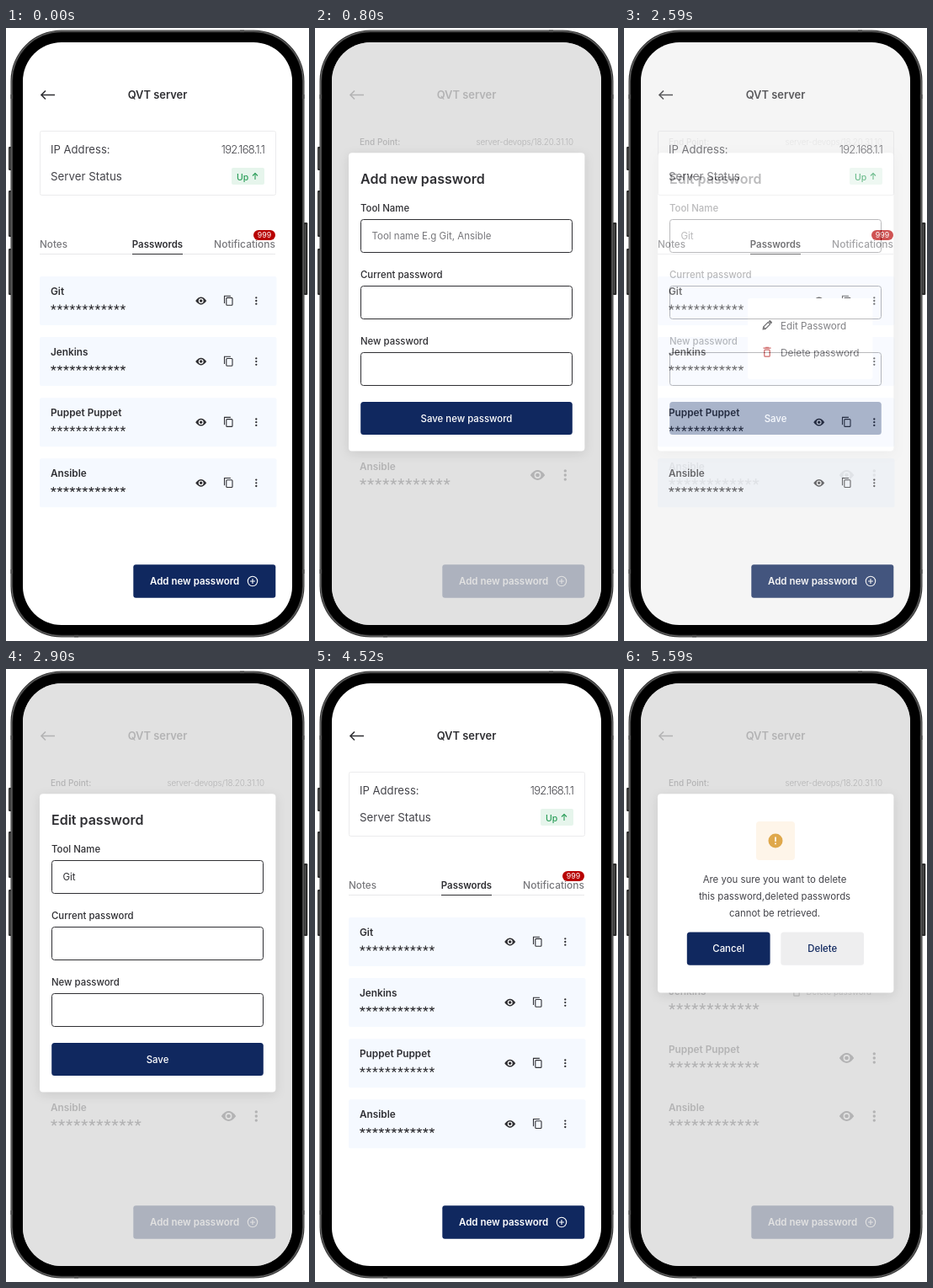
An HTML page with a canvas that plays this animation: 360x728 px, repeating every 5900 ms.

```html
<!DOCTYPE html>
<html lang="en">
<head>
<meta charset="utf-8">
<title>Password manager</title>
<style>
html, body { margin: 0; width: 100%; height: 100%; overflow: hidden; background: #fff; }
canvas { display: block; width: 360px; height: 728px; }
</style>
</head>
<body>
<canvas id="stage"></canvas>
<script>
const W = 360, H = 728, LOOP = 5900, STEP = 75;
const SCREEN = { x: 20, y: 17, w: 320, h: 692, r: 46 };
const LEFT = 40, RIGHT = 320, MID = 180, PAD = 53;
const NAVY = '#10285f', INK = '#2f2f33', TEXT = '#44444a', GREY = '#77777b';
const TOOLS = ['Git', 'Jenkins', 'Puppet Puppet', 'Ansible'];
const DPR = window.devicePixelRatio || 1;

let c;

function makeCanvas(canvas) {
  canvas.width = W * DPR;
  canvas.height = H * DPR;
  const ctx = canvas.getContext('2d');
  ctx.scale(DPR, DPR);
  return ctx;
}

function box(x, y, w, h, r, fill, stroke, width = 1) {
  c.beginPath();
  c.roundRect(x, y, w, h, r);
  if (fill) { c.fillStyle = fill; c.fill(); }
  if (stroke) { c.strokeStyle = stroke; c.lineWidth = width; c.stroke(); }
}

function disc(x, y, r, fill, stroke, width) {
  box(x - r, y - r, 2 * r, 2 * r, r, fill, stroke, width);
}

function line(color, width, ...p) {
  c.beginPath();
  for (let i = 0; i < p.length; i += 2) c.lineTo(p[i], p[i + 1]);
  c.strokeStyle = color;
  c.lineWidth = width;
  c.stroke();
}

function text(s, x, y, size, weight, color, align = 'left', spacing = 0) {
  c.font = `${weight} ${size}px Inter, "Open Sans", sans-serif`;
  c.textAlign = align;
  c.letterSpacing = spacing + 'px';
  c.fillStyle = color;
  c.fillText(s, x, y);
}

// Arrow with its tip at x, y, pointing along angle.
function arrow(x, y, angle, length, head, color, width) {
  c.save();
  c.translate(x, y);
  c.rotate(angle);
  line(color, width, 0, 0, -length, 0);
  line(color, width, -head, -head, 0, 0, -head, head);
  c.restore();
}

function eye(x, y, w) {
  const bulge = w * 0.68;
  c.beginPath();
  c.moveTo(x - w / 2, y);
  c.quadraticCurveTo(x, y - bulge, x + w / 2, y);
  c.quadraticCurveTo(x, y + bulge, x - w / 2, y);
  c.fillStyle = INK;
  c.fill();
  disc(x, y, w * 0.18, null, '#fff', w * 0.09);
}

function copyIcon(x, y) {
  box(x - 2.6, y - 3.6, 7.2, 8.8, 1, null, INK, 1.1);
  line(INK, 1.1, x - 4.9, y + 3, x - 4.9, y - 5.8, x + 2.5, y - 5.8);
}

function pencil(x, y) {
  c.save();
  c.translate(x, y);
  c.rotate(-Math.PI / 4);
  box(-4.5, -1.7, 8, 3.4, 0, null, INK, 1.2);
  box(4.4, -2.2, 2.4, 4.4, 1, INK);
  line(INK, 1.2, -4.5, -1.7, -6.8, 0, -4.5, 1.7);
  c.restore();
}

function trash(x, y, color) {
  box(x - 3.2, y - 2.8, 6.4, 8, 1, null, color, 1.2);
  line(color, 1.3, x - 4.5, y - 4.9, x + 4.5, y - 4.9);
  line(color, 1, x - 2, y - 5.7, x + 2, y - 5.7);
}

function dots(x, y, gap, r) {
  for (let i = -1; i < 2; i++) disc(x, y + i * gap, r, INK);
}

function stars(x, y, pitch) {
  const arm = pitch * 0.43;
  for (let i = 0; i < 12; i++) {
    for (let k = 0; k < 5; k++) {
      const a = Math.PI * (0.4 * k - 0.5), cx = x + (i + 0.45) * pitch;
      line(INK, arm * 0.36, cx, y, cx + arm * Math.cos(a), y + arm * Math.sin(a));
    }
  }
}

function button(label, x, y, w, h, fill = NAVY, color = '#fff') {
  box(x, y, w, h, 3.5, fill);
  text(label, x + w / 2, y + h / 2 + 4, 11.4, 500, color, 'center');
}

function header() {
  c.fillStyle = '#fff';
  c.fillRect(SCREEN.x, SCREEN.y, SCREEN.w, SCREEN.h);
  arrow(42, 79.5, Math.PI, 16, 5, INK, 1.6);
  text('QVT server', MID, 84, 12.9, 600, INK, 'center');
}

function addButton() {
  box(151.3, 637.3, 169, 39.5, 3, NAVY);
  text('Add new password', 171, 661, 11.5, 600, '#fff');
  disc(293, 657, 5.7, null, '#fff', 1.1);
  line('#fff', 1.1, 290, 657, 296, 657);
  line('#fff', 1.1, 293, 654, 293, 660);
}

function home() {
  header();
  box(40.5, 122.5, 280, 76, 2, null, '#ebebed');
  text('IP Address:', PAD, 149, 13.1, 400, TEXT);
  text('192.168.1.1', 307, 149, 13, 300, TEXT, 'right', -0.75);
  text('Server Status', PAD, 181, 13.3, 400, TEXT);
  box(268, 166, 39, 20, 2, '#e6f5ec');
  text('Up', 274, 180.5, 10.5, 500, '#2a9d58');
  arrow(296, 172.5, -Math.PI / 2, 7.5, 3, '#2a9d58', 1.1);

  line('#e8e8ea', 1, LEFT, 268.5, RIGHT, 268.5);
  line(INK, 1, 150, 268.5, 210, 268.5);
  text('Notes', LEFT, 261, 11.7, 500, GREY);
  text('Passwords', MID, 261, 11.4, 600, INK, 'center');
  text('Notifications', RIGHT, 261, 12, 500, GREY, 'right');
  box(294, 240, 26, 12, 6, '#b80000');
  text('999', 307, 249.4, 8.8, 400, '#fff', 'center');

  TOOLS.forEach((name, i) => {
    const y = 324 + i * 72.1;
    box(LEFT, y - 29, 281.5, 58, 2, '#f5f9ff');
    text(name, PAD, y - 7, 11.8, 600, INK);
    stars(PAD, y + 7.8, 7.5);
    eye(231.7, y, 13);
    copyIcon(264.4, y);
    dots(297.3, y, 3.7, 1.15);
  });
  addButton();
}

function menu() {
  home();
  box(147, 321, 148.5, 96, 3, '#fff');
  pencil(170, 353);
  text('Edit Password', 186, 358, 11.7, 400, TEXT);
  trash(170, 385, '#b81c1c');
  text('Delete password', 186, 390, 11.8, 400, TEXT);
}

function backdrop() {
  header();
  text('End Point:', PAD, 139, 10, 500, INK);
  text('server-devops/18.20.31.10', 307, 139, 9.8, 300, INK, 'right', -0.1);
  TOOLS.forEach((name, i) => {
    const y = 324 + i * 69;
    text(name, PAD, y - 6, 11.8, 600, INK);
    stars(PAD, y + 8, 9.05);
    eye(264.5, y, 17.5);
    dots(297.3, y, 5.1, 1.7);
  });
  box(190, 330, 120, 73, 3, '#fff');
  trash(205, 383, '#666');
  text('Delete password', 216.5, 386.5, 9.8, 400, GREY);
  addButton();
  c.fillStyle = 'rgba(217,217,217,.78)';
  c.fillRect(SCREEN.x, SCREEN.y, SCREEN.w, SCREEN.h);
}

function sheet(h) {
  backdrop();
  c.save();
  c.shadowColor = 'rgba(0,0,0,.1)';
  c.shadowBlur = 14 * DPR;
  c.shadowOffsetY = 3 * DPR;
  box(LEFT, 148.3, 280.4, h, 4, '#fff');
  c.restore();
}

function form(title, value, valueColor, action) {
  sheet(354.2);
  text(title, 54, 184.5, 16, 600, INK);
  ['Tool Name', 'Current password', 'New password'].forEach((label, i) => {
    const y = Math.round(227 + i * 78.8) + 0.5;
    text(label, 54, y - 9.5, 11.4, 500, INK);
    box(54.5, y, 251, 39, 3, null, INK);
  });
  text(value, 67.5, 251, 11.5, 400, valueColor);
  button(action, 54.2, 444, 251.6, 39);
}

function confirmDelete() {
  sheet(236.2);
  box(157, 181, 46, 46, 4, '#fef5e9');
  disc(MID, 204, 8.5, '#dfa84b');
  line('#fff', 1.6, MID, 199.6, MID, 205);
  line('#fff', 1.6, MID, 206.6, MID, 208.2);
  ['Are you sure you want to delete', 'this password,deleted passwords', 'cannot be retrieved.']
    .forEach((s, i) => text(s, 179, 254 + i * 19.8, 11.4, 400, TEXT, 'center'));
  button('Cancel', 74.8, 312.6, 98.8, 39.2);
  button('Delete', 186.3, 312.6, 98.8, 39.2, '#eeeeef', NAVY);
}

function sideButton(x, y, h) {
  box(x, y, 4.5, h, 1.2, '#2b2b2b');
  box(x + 1.2, y + 2, 1, h - 4, 0.5, '#5a5a5a');
}

function shell(margin, fill, stroke) {
  const { x, y, w, h, r } = SCREEN;
  box(x - margin, y - margin, w + 2 * margin, h + 2 * margin, r + margin, fill, stroke);
}

function phone() {
  sideButton(3, 141, 28);
  sideButton(3, 193, 55);
  sideButton(3, 262, 55);
  sideButton(353.8, 231, 86);
  shell(14.5, '#303030');
  shell(13.2, null, '#6a6a6a');
  shell(11.8, '#000');
  for (const y of [79, 643]) {
    for (const x of [5.5, 351.9]) box(x, y, 2.6, 5, 0, '#4c4c4c');
  }
  box(278, 2.5, 5, 2.6, 0, '#4c4c4c');
  box(81, 720.9, 5, 2.6, 0, '#4c4c4c');
}

function render(draw) {
  const canvas = document.createElement('canvas');
  c = makeCanvas(canvas);
  c.fillStyle = '#fff';
  c.fillRect(0, 0, W, H);
  phone();
  c.beginPath();
  c.roundRect(SCREEN.x, SCREEN.y, SCREEN.w, SCREEN.h, SCREEN.r);
  c.clip();
  draw();
  return canvas;
}

const scenes = {
  home: render(home),
  menu: render(menu),
  add: render(() => form('Add new password', 'Tool name E.g Git, Ansible', GREY, 'Save new password')),
  edit: render(() => form('Edit password', 'Git', INK, 'Save')),
  remove: render(confirmDelete)
};

// lead: how long the dissolve has already run at its first visible step.
const fades = [
  { from: 'home', to: 'add', start: 500, end: 800, lead: 55 },
  { from: 'add', to: 'home', start: 1300, end: 1600, lead: 60 },
  { from: 'home', to: 'menu', start: 1850, end: 2080, lead: 55 },
  { from: 'menu', to: 'edit', start: 2590, end: 2900, lead: 68 },
  { from: 'edit', to: 'home', start: 4230, end: 4520, lead: 20 },
  { from: 'home', to: 'remove', start: 5270, end: 5590, lead: 50 }
];

const easeOut = x => 1 - (1 - x) ** 2;

function opacity({ start, end, lead }, t) {
  const span = end - start;
  const count = Math.round(span / STEP);
  const step = Math.min(count, Math.floor((t - start) / span * count));
  return easeOut((step / count * span + lead) / (span + lead));
}

const view = makeCanvas(document.getElementById('stage'));

function frame() {
  const t = performance.now() % LOOP;
  const fade = fades.findLast(f => t >= f.start);
  view.globalAlpha = 1;
  view.drawImage(scenes[fade ? fade.from : 'home'], 0, 0, W, H);
  if (fade) {
    view.globalAlpha = opacity(fade, t);
    view.drawImage(scenes[fade.to], 0, 0, W, H);
  }
  requestAnimationFrame(frame);
}
frame();
</script>
</body>
</html>
```
